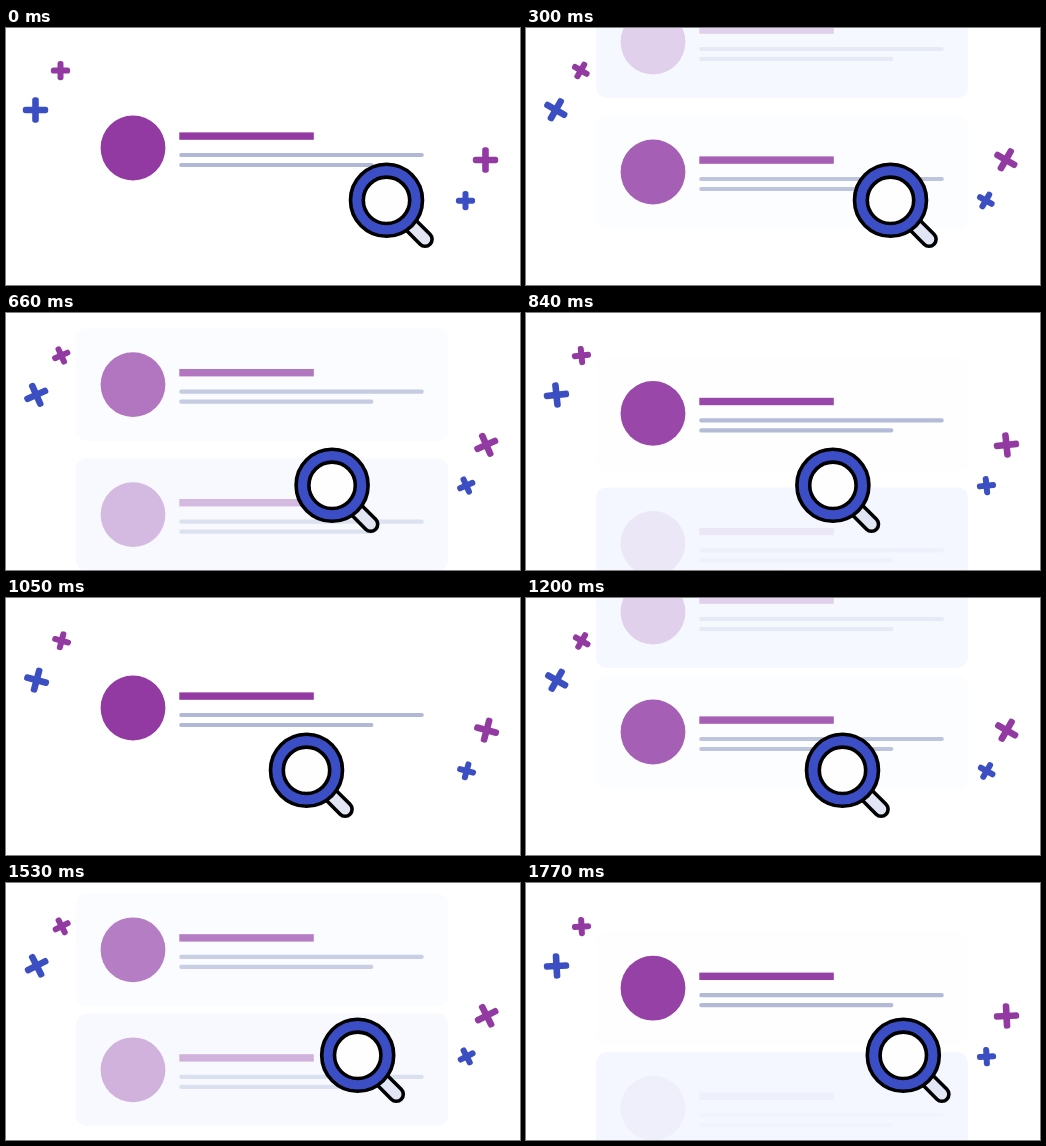
An HTML page that plays this animation: 514 by 257 pixels, repeating every 1800 ms.

```html
<!DOCTYPE html>
<html lang="en">
<head>
<meta charset="utf-8">
<title>Search results</title>
<style>
  html, body { margin: 0; width: 100%; height: 100%; overflow: hidden; background: #fff; }
  svg { display: block; width: 514px; height: 257px; }
</style>
</head>
<body>
<svg viewBox="0 0 514 257">
  <defs>
    <rect id="panel" x="70" y="-56" width="372" height="112" rx="10"/>
    <g id="content">
      <use href="#panel" fill="#fff"/>
      <circle cx="127" r="32.4" fill="#923aa2"/>
      <rect x="173.3" y="-15.6" width="134.5" height="7.4" fill="#923aa2"/>
      <g fill="#b0b8d5">
        <rect x="173.3" y="4.9" width="244.4" height="4.2" rx="1.8"/>
        <rect x="173.3" y="14.9" width="194" height="4.2" rx="1.8"/>
      </g>
    </g>
  </defs>
  <g id="cards"></g>
  <g id="crosses"></g>
  <g id="lens" stroke-linecap="round" fill="none">
    <path d="M24 24.3L38.6 38.9" stroke="#000" stroke-width="17.6"/>
    <path d="M24 24.3L38.6 38.9" stroke="#e2e6f4" stroke-width="10.4"/>
    <circle r="36" fill="#3b4ec5" stroke="#000" stroke-width="3.6"/>
    <circle r="23.2" fill="#fefeff" stroke="#000" stroke-width="3.6"/>
  </g>
</svg>
<script>
  const LOOP = 1800, HALF = 900, HOLD = 150, STEP = 30;
  const BLUE = '#3b4ec2', PURPLE = '#923aa2';
  const $ = id => document.getElementById(id);

  function add(parent, tag, attrs = {}) {
    const node = document.createElementNS('http://www.w3.org/2000/svg', tag);
    for (const key in attrs) node.setAttribute(key, attrs[key]);
    return parent.appendChild(node);
  }

  function makeCard() {
    const group = add($('cards'), 'g');
    add(group, 'use', { href: '#panel', fill: '#f4f7ff' });
    const content = add(group, 'use', { href: '#content' });
    return (y, opacity, visible) => {
      group.setAttribute('transform', `translate(0 ${y})`);
      group.setAttribute('visibility', visible ? 'visible' : 'hidden');
      content.setAttribute('opacity', opacity);
    };
  }

  // Each cross turns about a pivot slightly off its own centre.
  function makeCross(x, y, size, thick, fill) {
    const group = add($('crosses'), 'g', { fill });
    const bar = (w, h) => add(group, 'rect',
      { x: -w / 2 - 0.5, y: -h / 2 - 0.5, width: w, height: h, rx: 2.7 });
    bar(size, thick);
    bar(thick, size);
    return angle => group.setAttribute('transform',
      `translate(${x + 0.5} ${y + 0.5}) rotate(${angle})`);
  }

  const incoming = makeCard(), outgoing = makeCard();
  const crosses = [
    makeCross(54.5, 42.6, 19.2, 6, PURPLE),
    makeCross(29.5, 82, 25.4, 6.6, BLUE),
    makeCross(479.5, 132, 25.4, 6.6, PURPLE),
    makeCross(459.5, 172.7, 19.2, 6, BLUE)
  ];

  function draw(time) {
    const phase = time % HALF;
    const second = time >= HALF;
    const move = Math.max(0, phase - HOLD) / (HALF - HOLD);

    incoming(-10 + 120 * move, move, move > 0);
    outgoing((second ? 110 : 120) + 120 * move, 1 - move, true);

    const lensX = 380.5 - 80 * (second ? 1 - move : move);
    $('lens').setAttribute('transform', `translate(${lensX} 172.3)`);
    crosses.forEach(turn => turn(180 * time / LOOP));
  }

  const start = performance.now();
  function tick() {
    const time = (performance.now() - start) % LOOP;
    draw(Math.floor(time / STEP) * STEP);
    requestAnimationFrame(tick);
  }
  tick();
</script>
</body>
</html>
```
